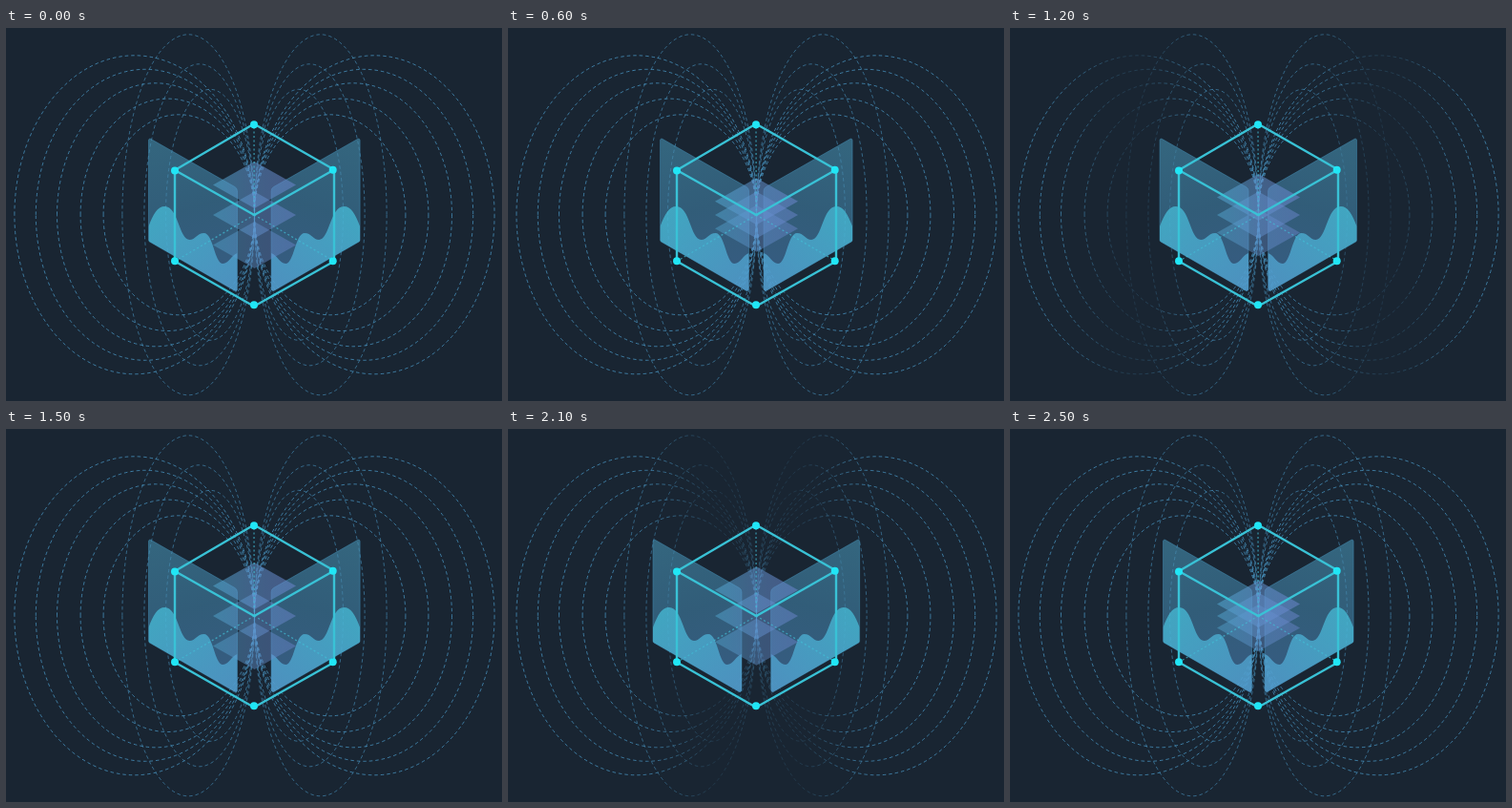
These frames come from a looping animation (520x391 px, 2.9 s). An HTML page with a canvas:

```html
<!DOCTYPE html>
<html lang="en">
<head>
<meta charset="utf-8">
<title>Cube and field lines</title>
<style>
  html, body { margin: 0; width: 100%; height: 100%; overflow: hidden; background: #192532; }
  canvas { display: block; width: 520px; height: 391px; }
</style>
</head>
<body>
<canvas id="stage" width="520" height="391"></canvas>
<script>
const ctx = document.getElementById('stage').getContext('2d');
const W = 520, H = 391, LOOP = 2900, STEP = 100;
const AXIS = 260.5, FIELD_Y = 195.8;

// Field loops all touch the vertical axis: [rx, ry]
const LOOPS = [
  [125.8, 167], [114.6, 152.5], [103.5, 138], [91.2, 121.7], [79.2, 105],
  [69.3, 189], [57.8, 158], [46.5, 131.5]
];

const TOP = [260, 100.5], UR = [344, 148.5], LR = [344, 244.5];
const BOTTOM = [260, 291.8], LL = [177, 244.5], UL = [177, 149], MID = [260.3, 196];
const DOTS = [[260, 101.3], [342.7, 148.7], [342.7, 244.3], [260, 290.2], [177, 244.3], [177, 149.6]];

const smooth = x => x * x * (3 - 2 * x);
const closing = n => Math.pow(smooth(n / 7), 1.6);

// 0 = panels and layers apart, 1 = together; motion is stepped every 100 ms
function closeness(t) {
  const k = Math.floor(t / STEP);
  if (k < 10) return closing(Math.min(k, 6));
  if (k < 19) return closing(6) * (1 - smooth(Math.min(k - 9, 6) / 6) ** 2);
  return closing(Math.min(k - 18, 7));
}

function trace(points, close) {
  ctx.beginPath();
  points.forEach(([x, y]) => ctx.lineTo(x, y));
  if (close) ctx.closePath();
}

function gradient(x0, y0, x1, y1, ...colors) {
  const g = ctx.createLinearGradient(x0, y0, x1, y1);
  colors.forEach((c, i) => g.addColorStop(i / (colors.length - 1), c));
  return g;
}

// A dim band sweeps between the axis and the outer loops
function fieldStroke(p) {
  const center = 210 * p - 10;
  const depth = p > 0.9 ? 0 : 0.75 * Math.min(1, 6 * p, 6 * (1 - p));
  const colors = Array.from({ length: 53 }, (_, i) => {
    const d = (Math.abs(i * 10 - AXIS) - center) / 55;
    const alpha = 0.76 * (1 - depth * Math.exp(-d * d));
    return `rgba(72,150,196,${alpha.toFixed(3)})`;
  });
  return gradient(0, 0, W, 0, ...colors);
}

function drawField(p) {
  ctx.save();
  ctx.strokeStyle = fieldStroke(p);
  ctx.lineWidth = 1;
  ctx.setLineDash([3.5, 3]);
  LOOPS.forEach(([rx, ry], i) => {
    ctx.globalAlpha = i < 5 ? 1 : 0.8;
    for (const side of [-1, 1]) {
      const from = side < 0 ? Math.PI : 0;
      ctx.beginPath();
      ctx.ellipse(AXIS + side * rx, FIELD_Y, rx, ry, 0, from, from + Math.PI * 2);
      ctx.stroke();
    }
  });
  ctx.restore();
}

function panelPath() {
  ctx.beginPath();
  ctx.moveTo(0, 54);
  ctx.arcTo(0, 0, 93, 53, 1.5);
  ctx.arcTo(93, 53, 93, 162, 5);
  ctx.arcTo(93, 162, 0, 108.5, 2);
  ctx.arcTo(0, 108.5, 0, 0, 2);
  ctx.closePath();
}

function drawPanel() {
  panelPath();
  ctx.fillStyle = gradient(0, 0, 45, 160,
    'rgba(70,146,178,.6)', 'rgba(66,130,168,.6)', 'rgba(74,128,182,.6)');
  ctx.fill();
  ctx.strokeStyle = 'rgba(66,140,178,.5)';
  ctx.lineWidth = 1;
  ctx.stroke();

  ctx.save();
  ctx.clip();
  ctx.beginPath();
  ctx.moveTo(0, 93);
  ctx.bezierCurveTo(5, 80, 9, 72, 17, 72);
  ctx.bezierCurveTo(31, 72, 32, 107, 43, 107);
  ctx.bezierCurveTo(49, 107, 51, 100, 58, 100);
  ctx.bezierCurveTo(68, 100, 69, 132, 78, 132);
  ctx.bezierCurveTo(84, 132, 87, 123, 93, 121);
  ctx.lineTo(93, 164);
  ctx.lineTo(0, 110);
  ctx.closePath();
  ctx.fillStyle = gradient(10, 70, 80, 160, 'rgba(70,192,218,.74)', 'rgba(84,164,212,.74)');
  ctx.fill();
  ctx.restore();
}

function drawPanels(p) {
  for (const side of [-1, 1]) {
    ctx.save();
    ctx.translate(260.3 + side * (110.8 - 11 * p), 115);
    ctx.scale(-side, 1);
    drawPanel();
    ctx.restore();
  }
}

function drawLayers(p) {
  const gap = 31.5 - 19 * p;
  ctx.save();
  ctx.fillStyle = gradient(217, 0, 304, 0, 'rgb(80,166,206)', 'rgb(98,146,206)', 'rgb(108,132,204)');
  for (const i of [1, 0, -1]) {
    const y = 196 + i * gap;
    ctx.globalAlpha = 0.5 - 0.05 * i;
    trace([[260.5, y - 24.5], [304, y], [260.5, y + 24.5], [217, y]], true);
    ctx.fill();
  }
  ctx.restore();
}

function drawCube() {
  ctx.save();
  ctx.lineJoin = 'round';
  ctx.strokeStyle = 'rgba(66,190,214,.7)';
  ctx.lineWidth = 1.3;
  ctx.setLineDash([2, 2.5]);
  for (const end of [TOP, LL, LR]) {
    trace([MID, end]);
    ctx.stroke();
  }
  ctx.setLineDash([]);
  ctx.strokeStyle = '#39c2d6';
  ctx.lineWidth = 2.4;
  trace([TOP, UR, LR, BOTTOM, LL, UL], true);
  ctx.stroke();
  trace([UL, MID, UR]);
  ctx.stroke();
  ctx.fillStyle = '#20e6f6';
  for (const [x, y] of DOTS) {
    ctx.beginPath();
    ctx.arc(x, y, 4, 0, Math.PI * 2);
    ctx.fill();
  }
  ctx.restore();
}

function render(t) {
  const p = closeness(t);
  ctx.fillStyle = '#192532';
  ctx.fillRect(0, 0, W, H);
  drawField(p);
  drawPanels(p);
  drawLayers(p);
  drawCube();
}

const start = performance.now();
function tick() {
  render((performance.now() - start) % LOOP);
  requestAnimationFrame(tick);
}
tick();
</script>
</body>
</html>
```
